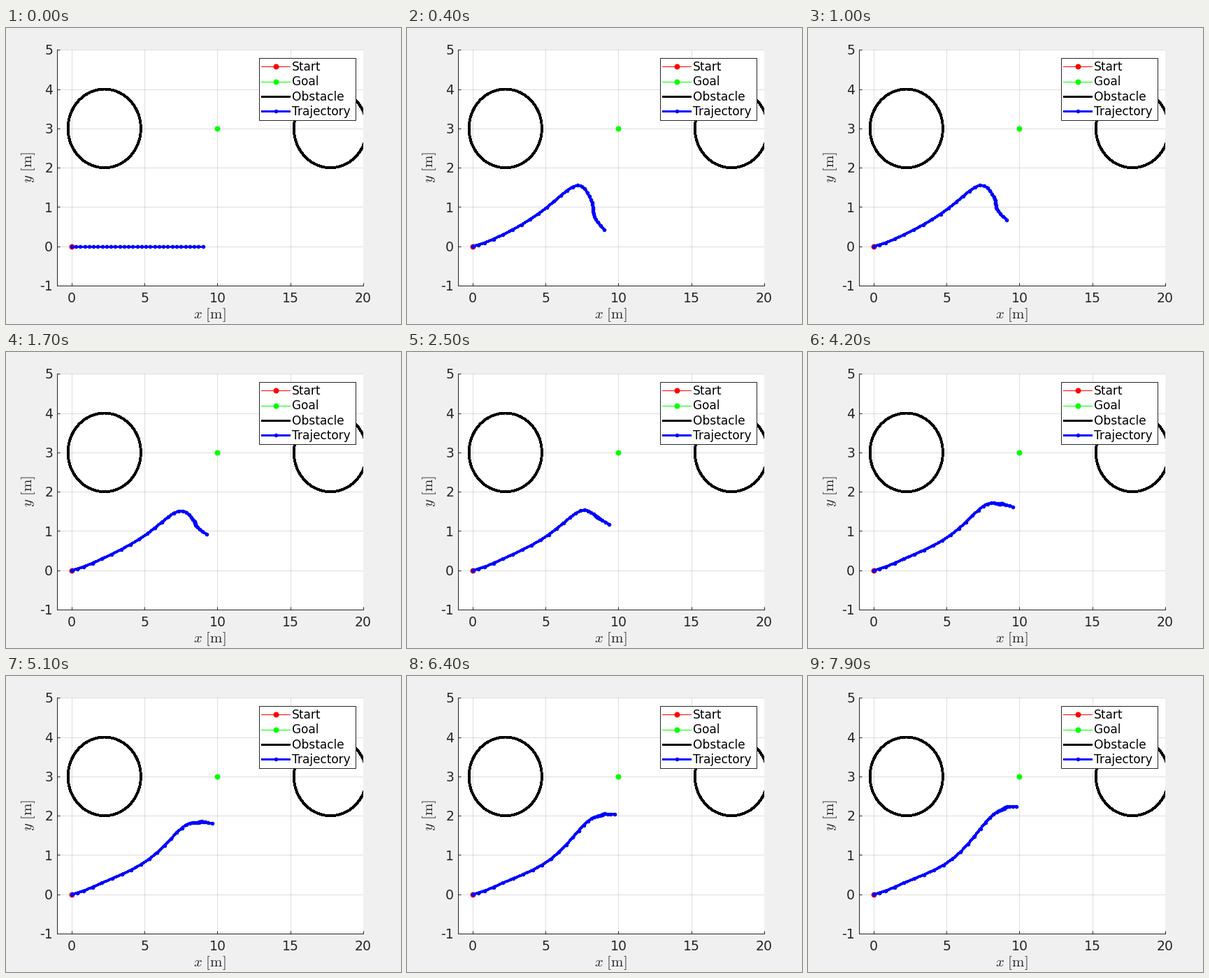
A matplotlib script that plays this animation: 565 px wide and 424 px high, repeating every 8000 ms.

```python
import numpy as np
import matplotlib.pyplot as plt
from matplotlib.animation import FuncAnimation
from matplotlib.patches import Ellipse, Rectangle

W, H, DPI = 565, 424, 100
FRAMES, STEP_MS = 80, 100
LEFT, RIGHT, TOP, BOTTOM = 73, 510.9, 31.3, 369
UNIT_X, UNIT_Y = (RIGHT - LEFT) / 21, (BOTTOM - TOP) / 6
INK = (0.15, 0.15, 0.15)
PX = 72 / DPI  # points per pixel

plt.rcParams.update({"font.family": "DejaVu Sans", "mathtext.fontset": "cm"})


def spline(t, p, q):
    """Natural cubic spline through the points p at t, evaluated at q."""
    n, h = len(t), np.diff(t)
    a, r = np.eye(n), np.zeros_like(p)
    for i in range(1, n - 1):
        a[i, i - 1:i + 2] = h[i - 1], 2 * (h[i - 1] + h[i]), h[i]
        r[i] = 6 * ((p[i + 1] - p[i]) / h[i] - (p[i] - p[i - 1]) / h[i - 1])
    m = np.linalg.solve(a, r)
    k = np.clip(np.searchsorted(t, q, "right") - 1, 0, n - 2)
    hk = h[k][:, None]
    v = (q - t[k])[:, None] / hk
    u = 1 - v
    bend = (u**3 - u) * m[k] + (v**3 - v) * m[k + 1]
    return u * p[k] + v * p[k + 1] + bend * hk**2 / 6


# Path in metres: a fixed departure, then a tail that relaxes toward the goal
STEPS = np.arange(31)
GUESS = np.column_stack([0.3 * STEPS, 0 * STEPS])
KNOTS = np.array([0, 2, 4, 9, 14, 18, 23, 28, 30])
DEPART = [(0, 0), (0.84, 0.09), (2.09, 0.29)]
FIRST = np.array(DEPART + [(5.09, 0.91), (7.19, 1.21), (8.01, 0.77),
                           (8.21, 0.60), (8.51, 0.42), (8.96, 0.24)])
FINAL = np.array(DEPART + [(5.51, 0.89), (7.85, 2.05), (8.81, 2.62),
                           (9.25, 2.77), (9.63, 2.90), (10.12, 2.97)])


def trajectory(k):
    relax = 1 - np.exp(-k / 60)
    path = spline(KNOTS, FIRST + relax * (FINAL - FIRST), STEPS)
    # early hump that fades away
    path[:, 1] += 0.43 * np.exp(-(k / 15)**2 - ((STEPS - 17.5) / 7)**2)
    return GUESS + (1 - 0.35**k) * (path - GUESS)


fig = plt.figure(figsize=(W / DPI, H / DPI), dpi=DPI, facecolor=(0.94,) * 3)
ax = fig.add_axes([LEFT / W, 1 - BOTTOM / H, (RIGHT - LEFT) / W, (BOTTOM - TOP) / H])
ax.set(xlim=(-1, 20), ylim=(-1, 5), xticks=range(0, 21, 5), yticks=range(-1, 6))
ax.set_axisbelow(True)
ax.grid(color=INK, alpha=0.15, lw=PX)
ax.tick_params(direction="in", length=4.4 * PX, width=PX, color=INK,
               labelbottom=False, labelleft=False)
for side, spine in ax.spines.items():
    spine.set_visible(side in ("left", "bottom"))
    spine.set(linewidth=PX, color=INK)

# Full-stage layer in pixel units for text and legend
top = fig.add_axes([0, 0, 1, 1], xlim=(0, W), ylim=(H, 0))
top.axis("off")


def label(x, y, s, size, color=INK, **kw):
    top.text(x, y, s, fontsize=size * PX, color=color, va="baseline", **kw)


for x in range(0, 21, 5):
    label(LEFT + (x + 1) * UNIT_X, 393, str(x), 18.9, ha="center")
for y in range(-1, 6):
    label(67.2, BOTTOM - (y + 1) * UNIT_Y + 7.2, str(y), 18.9, ha="right")
label(291.5, 416.5, r"$x\ \mathrm{[m]}$", 20.8, ha="center")
label(37, 199.5, r"$y\ \mathrm{[m]}$", 20.8, rotation=90, rotation_mode="anchor",
      ha="center")


def stroke(color, width=0, dot=0):
    """Hard-edged line style with optional round dots, sizes in pixels."""
    return dict(color=color, lw=width * PX, marker="o" if dot else "", ms=dot * PX,
                mec="none", antialiased=False, solid_capstyle="butt",
                solid_joinstyle="round")


for cx in (2.25, 17.75):
    ax.add_patch(Ellipse((cx, 3), 5, 2, fill=False, ec="black", lw=2.8 * PX,
                         antialiased=False, zorder=3))
ax.plot(0, 0, zorder=4, **stroke("red", dot=8))
ax.plot(10, 3, zorder=4, **stroke("lime", dot=8))
line, = ax.plot([], [], zorder=5, **stroke("blue", 2.8, 5.6))

top.add_patch(Rectangle((362, 43), 138, 89, fc="white", ec=INK, lw=PX))
ROWS = [("Start", "red", 1, 8), ("Goal", "lime", 1, 8),
        ("Obstacle", "black", 2.8, 0), ("Trajectory", "blue", 2.8, 5.6)]
for i, (name, color, width, dot) in enumerate(ROWS):
    y = 55.2 + 21.4 * i
    top.plot([365, 406], [y, y], **stroke(color, width))
    top.plot(385.5, y, **stroke(color, dot=dot))
    label(409, y + 5.8, name, 17, color="black")


def update(k):
    line.set_data(*trajectory(k).T)
    return line,


anim = FuncAnimation(fig, update, frames=FRAMES, interval=STEP_MS,
                     repeat=True, repeat_delay=0)
plt.show()
```
